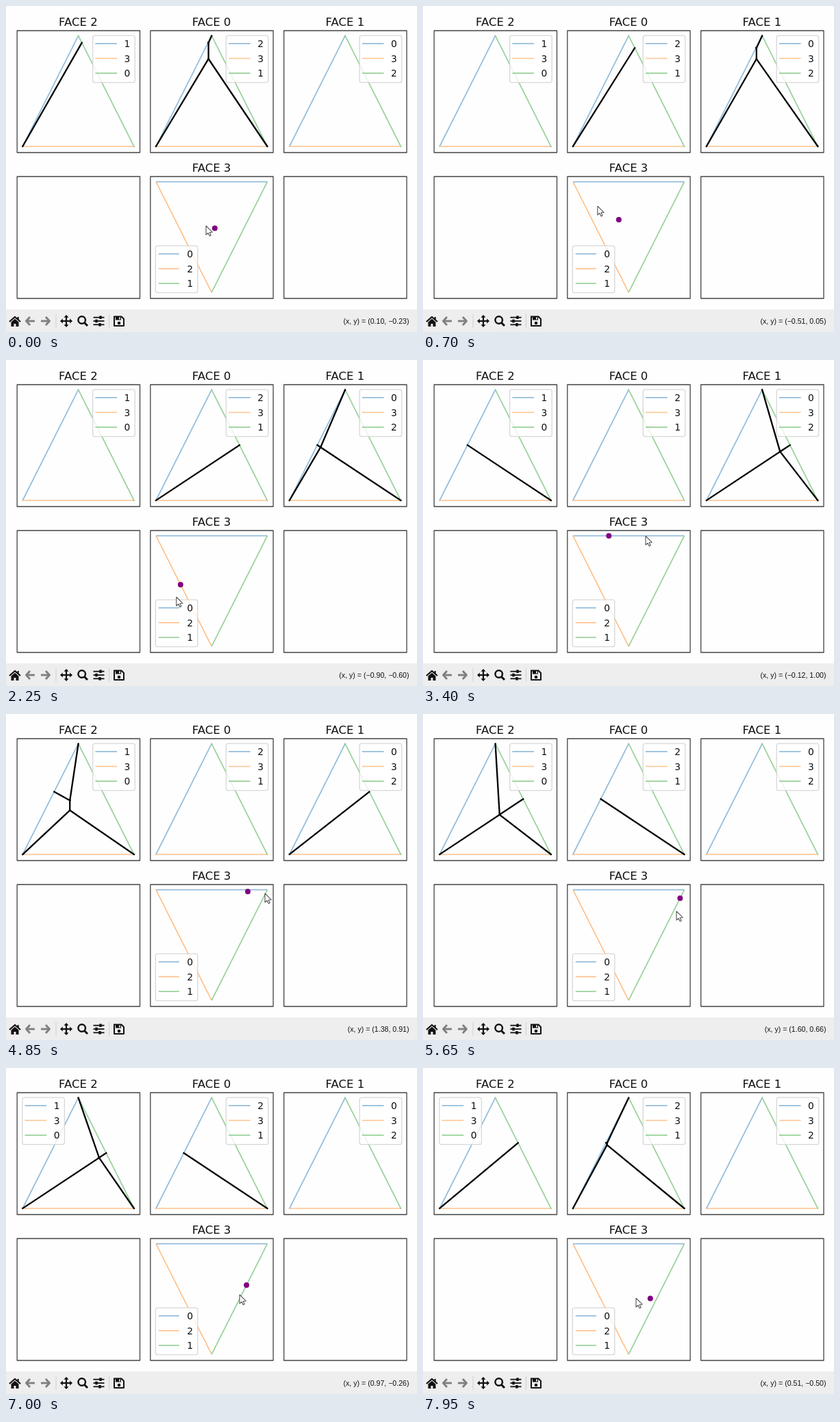
An HTML page with a canvas that plays this animation: 600x476 px, repeating every 8000 ms.

```html
<!DOCTYPE html>
<html lang="en">
<head>
<meta charset="utf-8">
<title>Cut locus on a tetrahedron</title>
<style>
html, body { margin: 0; width: 100%; height: 100%; overflow: hidden; background: #fefefe; }
canvas { display: block; }
</style>
</head>
<body>
<canvas id="stage" width="600" height="476"></canvas>
<script>
const g = document.getElementById('stage').getContext('2d');
const R = Math.sqrt(3), SX = 46.94, SY = 53.83, LOOP = 8000, TURN = 2 * Math.PI / 3;
const COLORS = ['#93bddb', '#ffc18b', '#99d199'], INK = '#111', BAR = '#eee';

// Key points of the drag: purple dot, pointer tip, coordinate readout
const KEYS = [
  { t: 0, dot: [304.8, 324.5], tip: [292, 321], at: [.10, -.23] },
  { t: 1400, dot: [264, 297.5], tip: [212, 259], at: [-1.21, .38] },
  { t: 2200, dot: [254.8, 328], tip: [247, 358], at: [-.90, -.60] },
  { t: 2650, dot: [254.8, 328], tip: [262, 250], at: [-.90, -.60] },
  { t: 2900, dot: [248, 256.7], tip: [284, 255], at: [-.60, 1] },
  { t: 3400, dot: [271.3, 256.7], tip: [325, 257], at: [-.12, 1] },
  { t: 4850, dot: [353, 259.2], tip: [378, 262], at: [1.38, .91] },
  { t: 5650, dot: [375.3, 269], tip: [370, 288], at: [1.60, .66] },
  { t: 7000, dot: [351.1, 317], tip: [341, 331], at: [.97, -.26] },
  { t: 7950, dot: [331.8, 336.4], tip: [311, 336], at: [.51, -.50] }
];

// The plot redraws every 50 ms while it keeps up, otherwise every 250 ms
function redrawTime(t) {
  const smooth = t < 200 || t >= 1500 && t < 2450 || t >= 4700;
  return smooth ? Math.floor(t / 50) * 50 : Math.floor((t - 150) / 250) * 250 + 150;
}

const mix = (a, b, u) => a.map((v, i) => v + (b[i] - v) * u);

function pose(t) {
  const i = Math.max(1, KEYS.findIndex(k => k.t >= t));
  const a = KEYS[i - 1], b = KEYS[i], u = (t - a.t) / (b.t - a.t);
  return ['dot', 'tip', 'at'].map(k => mix(a[k], b[k], u));
}

const rotate = ([x, y], a) =>
  [x * Math.cos(a) - y * Math.sin(a), x * Math.sin(a) + y * Math.cos(a)];

// Voronoi edges of all unfolded images of s, clipped to the face above the top edge
function cutLocus([sx, sy]) {
  const pts = [], out = [];
  for (let i = -1; i <= 1; i++) for (let j = -1; j <= 1; j++) {
    const x = 4 * R * i + 2 * R * j, y = 6 * j;
    pts.push([sx + x, sy + y], [-2 * R - sx + x, 2 - sy + y]);
  }
  const sides = [[0, -1, -1], [-R, 1, 4], [R, 1, 4]];
  const norm = p => p[0] * p[0] + p[1] * p[1];
  pts.forEach((p, i) => pts.slice(i + 1).forEach(q => {
    const m = mix(p, q, .5), len = Math.hypot(q[0] - p[0], q[1] - p[1]);
    if (len < 1e-6) return;
    const d = [(p[1] - q[1]) / len, (q[0] - p[0]) / len];
    let lo = -20, hi = 20;
    const clip = (a, b, c) => {
      const k = a * d[0] + b * d[1], rest = c - a * m[0] - b * m[1];
      if (Math.abs(k) < 1e-9) { if (rest < -1e-6) hi = lo - 1; }
      else if (k > 0) hi = Math.min(hi, rest / k);
      else lo = Math.max(lo, rest / k);
      return hi - lo > 1e-3;
    };
    const nearest = r => r === p || r === q ||
      clip(2 * (r[0] - p[0]), 2 * (r[1] - p[1]), norm(r) - norm(p));
    if (sides.every(s => clip(...s)) && pts.every(nearest))
      out.push([lo, hi].map(t => [m[0] + d[0] * t, m[1] + d[1] * t]));
  }));
  return out;
}

function line(color, width, ...pts) {
  g.strokeStyle = color;
  g.lineWidth = width;
  g.beginPath();
  pts.forEach(p => g.lineTo(...p));
  g.stroke();
}

function shape(color, ...pts) {
  g.fillStyle = color;
  g.beginPath();
  pts.forEach(p => g.lineTo(...p));
  g.fill();
}

function disc(color, x, y, r) {
  g.fillStyle = color;
  g.beginPath();
  g.arc(x, y, r, 0, 7);
  g.fill();
}

function rect(color, x, y, w, h) {
  g.fillStyle = color;
  g.fillRect(x, y, w, h);
}

function text(str, x, y, font, align) {
  g.font = font;
  g.textAlign = align;
  g.fillStyle = INK;
  g.fillText(str, x, y);
}

function axes(x, y, title) {
  g.strokeStyle = '#444';
  g.lineWidth = 1.3;
  g.strokeRect(x, y, 179.3, 178);
  if (title) text(title, x + 89.2, y - 7.2, '16.5px "DejaVu Sans", sans-serif', 'center');
}

function triangle(corners, order) {
  order.forEach(([a, b], i) => line(COLORS[i], 1.7, corners[a], corners[b]));
}

function legend(x, y, labels) {
  g.beginPath();
  g.roundRect(x, y, 61.5, 68.5, 3);
  g.fillStyle = 'rgba(255,255,255,.8)';
  g.fill();
  g.strokeStyle = '#d8d8d8';
  g.lineWidth = 1.3;
  g.stroke();
  COLORS.forEach((c, i) => {
    const ly = y + 11.7 + 21.6 * i;
    line(c, 1.7, [x + 4.5, ly], [x + 34.5, ly]);
    text(labels[i], x + 50.3, ly + 5, '13.8px "DejaVu Sans", sans-serif', 'center');
  });
}

function face(x, name, labels, s) {
  const mid = x + 89.4, half = R * SX;
  axes(x, 36, 'FACE ' + name);
  triangle([[mid - half, 205], [mid + half, 205], [mid, 43.5]], [[0, 2], [0, 1], [1, 2]]);
  let covered = false;
  for (const seg of cutLocus(s)) {
    const [a, b] = seg.map(p => [mid + p[0] * SX, 205 - (p[1] - 1) * SY]);
    line('#000', 2.3, a, b);
    for (let u = 0; u <= 1; u += .02) {
      const [px, py] = mix(a, b, u);
      if (px > x + 112 && py < 110.5) covered = true;
    }
  }
  // the legend moves to the free corner when a line runs under it
  legend(x + (covered ? 7.7 : 110.5), 43.2, labels);
}

function arrow(x, dir) {
  line('#808080', 2.9, [x - 6 * dir, 460], [x + 6 * dir, 460]);
  line('#808080', 2.9, [x + dir, 454], [x + 6.5 * dir, 460], [x + dir, 466]);
}

function toolbar([x, y]) {
  rect(BAR, 0, 443, 600, 33);
  // home
  line(INK, 2.2, [5, 461], [13, 454], [21, 461]);
  shape(INK, [7.5, 461.5], [13, 456.8], [18.5, 461.5], [18.5, 468], [7.5, 468]);
  rect(BAR, 11.5, 464, 3, 4);
  rect(INK, 16.5, 454, 2.2, 4);
  arrow(36, -1);
  arrow(57, 1);
  for (const sep of [72.5, 150]) rect('#cfcfcf', sep, 450, 1, 20);
  // pan
  for (let k = 0; k < 4; k++) {
    const arm = [[0, 0], [6, 0], [9, 0], [5.2, -3.5], [5.2, 3.5]].map(p => {
      const [dx, dy] = rotate(p, k * Math.PI / 2);
      return [88 + dx, 460 + dy];
    });
    line(INK, 2.2, arm[0], arm[1]);
    shape(INK, ...arm.slice(2));
  }
  // zoom
  line(INK, 3, [114, 462], [119, 467]);
  disc(INK, 110.7, 458.5, 6.5);
  disc(BAR, 110.7, 458.5, 4);
  // sliders
  [138, 132, 137].forEach((knob, i) => {
    const sy = 454.7 + 5.3 * i;
    line(INK, 1.8, [127.5, sy], [143.5, sy]);
    rect(INK, knob - 1.7, sy - 2.3, 3.4, 4.6);
  });
  // save
  line(INK, 2, [158, 453.5], [168.5, 453.5], [172, 457], [172, 467], [158, 467], [158, 452.5]);
  rect(INK, 160, 454, 8, 4.5);
  rect(BAR, 165, 454.5, 1.8, 3);
  disc(INK, 165, 463, 2.3);
  const num = v => v.toFixed(2).replace('-', '\u2212');
  text(`(x, y) = (${num(x)}, ${num(y)})`, 588.5, 463.5,
    '10.6px "Liberation Sans", Arial, sans-serif', 'right');
}

function pointer(x, y) {
  const pts = [[0, 0], [0, 13], [3, 10.3], [5.2, 14.8], [7.2, 13.8], [5.2, 9.5], [9.2, 9.2], [0, 0]]
    .map(p => [x + p[0], y + p[1]]);
  shape('#fff', ...pts);
  line('#555', 1.1, ...pts);
}

function draw(t) {
  const [dot, tip, at] = pose(redrawTime(t));
  const s = [(dot[0] - 300.2) / SX, 1 - (dot[1] - 256.7) / SY];
  rect('#fefefe', 0, 0, 600, 476);
  g.lineCap = 'square';
  g.lineJoin = 'round';
  face(16.2, 2, [1, 3, 0], rotate(s, -TURN));
  face(210.8, 0, [2, 3, 1], s);
  face(405.7, 1, [0, 3, 2], rotate(s, TURN));
  g.lineCap = 'butt';
  axes(16.2, 249);
  axes(405.7, 249);
  axes(210.8, 249, 'FACE 3');
  triangle([[218.9, 256.7], [381.5, 256.7], [300.2, 418.2]], [[0, 1], [0, 2], [1, 2]]);
  disc('#800080', ...dot, 4);
  legend(218.3, 350.2, [0, 2, 1]);
  toolbar(at);
  pointer(...tip);
}

function tick(now) {
  draw(now % LOOP);
  requestAnimationFrame(tick);
}
draw(0);
requestAnimationFrame(tick);
</script>
</body>
</html>
```
